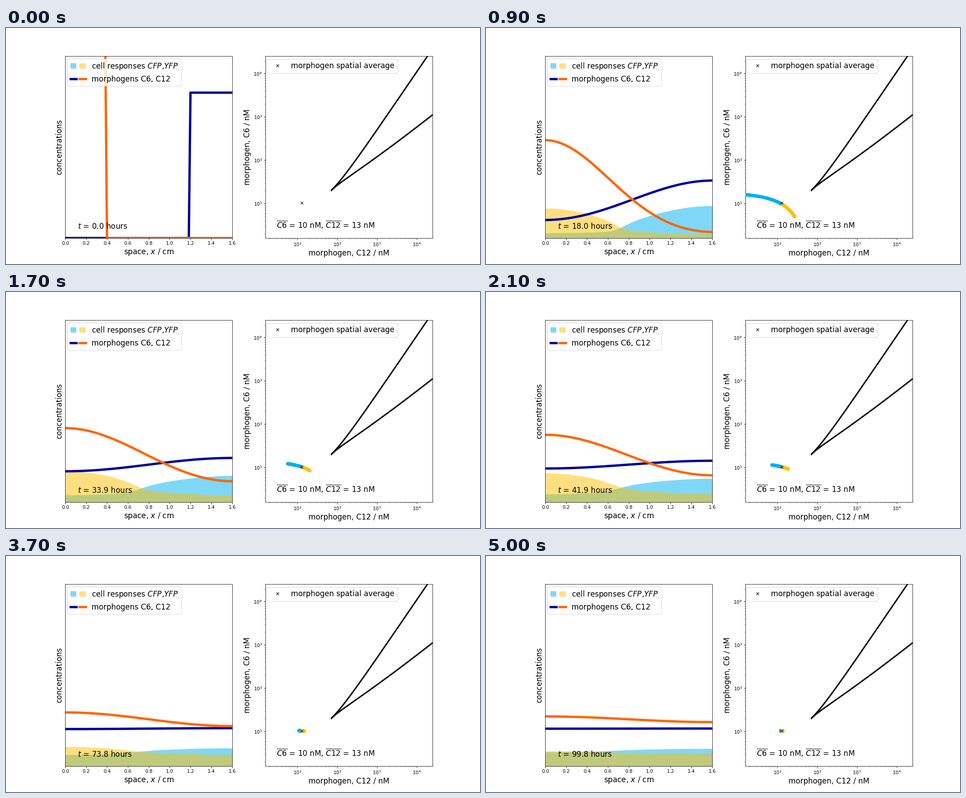
A matplotlib script that plays this animation: 1058x529 px, repeating every 5.1 s.

```python
import numpy as np
import matplotlib.pyplot as plt
from matplotlib.animation import FuncAnimation
from matplotlib.legend_handler import HandlerTuple
from matplotlib.patches import Patch

FRAMES, INTERVAL = 51, 100
HOURS_PER_FRAME = 1.9955
N, LENGTH, TOP = 101, 1.6, 50
NAVY, ORANGE, CYAN, YELLOW = "#000099", "#ff6600", "#00b0f0", "#ffc000"
FS = 16

cell = np.arange(N)
x = np.linspace(0, LENGTH, N)
MODES = np.cos(np.pi * np.outer(cell + 0.5, cell) / N)
C6_START = np.where(cell >= 75, 40.0, 0.0)
C12_START = np.where(cell < 25, 52.0, 0.0)


def diffuse(start, diffusivity, hours):
    """Diffusion with closed ends, as a decaying cosine series."""
    weights = MODES.T @ start * 2 / N
    weights[0] /= 2
    rate = diffusivity * (np.pi * cell / (N * LENGTH / (N - 1))) ** 2
    return MODES @ (weights * np.exp(-rate * hours))


def fade(t, tau, power=1):
    return np.exp(-(t / tau) ** power)


def rise(t, tau, power=1):
    return 1 - fade(t, tau, power)


def branches(base, gap, drop, lift, near, share):
    """Blend an induced branch (falling from its peak) with a repressed one."""
    induced = base + gap * (1 - drop * (1 - near))
    repressed = base + gap * lift * near
    return np.maximum(share * induced + (1 - share) * repressed, 0) * TOP / 407.3


def responses(t):
    """CFP and YFP levels along space after t hours."""
    right = (1 - np.cos(np.pi * x / LENGTH)) / 2
    border, blur = 0.73 - 0.0008 * t, 0.05 + 0.0006 * t
    share = 1 / (1 + np.exp((x - border) / blur))

    cfp_base = (7.5 + 0.243 * t) * rise(t, 5)
    cfp_gap = 109 * rise(t, 9.3, 1.3) * fade(t, 37)
    cfp_drop = 0.65 + 0.6 * fade(t, 36, 3)
    cfp = branches(cfp_base, cfp_gap, cfp_drop, 1.3 - cfp_drop, right, 1 - share)

    yfp_base = 29.5 * rise(t, 42, 1.3)
    yfp_gap = 73 * rise(t, 11.8, 1.7) * fade(t, 62, 2)
    yfp = branches(yfp_base, yfp_gap, 1.27 + fade(t, 10), 0.2 + 0.0047 * t,
                   1 - right, share)
    return cfp, yfp


fig, (ax, bx) = plt.subplots(1, 2, figsize=(14, 7), dpi=75.5715)

# Left panel: profiles in space
ax.set(xlim=(0, LENGTH), ylim=(0, TOP), yticks=[])
ax.set_xlabel("space, $x$ / cm", fontsize=FS)
ax.set_ylabel("concentrations", fontsize=FS)
c6_line, = ax.plot(x, C6_START, color=NAVY, lw=5)
c12_line, = ax.plot(x, C12_START, color=ORANGE, lw=5)
clock = ax.text(0.12, 2.6, "", fontsize=FS)
patches = tuple(Patch(facecolor=c, alpha=0.5, lw=0) for c in (CYAN, YELLOW))
ax.legend([patches, (c6_line, c12_line)],
          ["cell responses $CFP$,$YFP$", "morphogens C6, C12"],
          handler_map={tuple: HandlerTuple(ndivide=None)},
          loc="upper left", borderaxespad=0.3, fontsize=FS)
fills = []

# Right panel: morphogen plane, with a cusp-shaped region in log coordinates
LIMITS = (10 ** 0.2, 10 ** 4.4)
bx.set(xscale="log", yscale="log", xlim=LIMITS, ylim=LIMITS)
bx.set_xlabel("morphogen, C12 / nM", fontsize=FS)
bx.set_ylabel("morphogen, C6 / nM", fontsize=FS)
s = np.linspace(0, 2.7, 150)
upper = 1.345 * s - 0.15 * rise(s, 0.35)
lower = 0.62 * s + 0.02 * s ** 2 + 0.04 * rise(s, 0.12)
bx.plot(10 ** (1.851 + np.append(s[::-1], s)),
        10 ** (1.298 + np.append(upper[::-1], lower)), color="k", lw=3)
mean, = bx.plot(C12_START.mean(), C6_START.mean(), "kx", ms=6, ls="none", zorder=4,
                label="morphogen spatial average")
cloud = bx.scatter([], [], s=40, zorder=3)
bx.text(3, 2.66, r"$\overline{C6}$ = 10 nM, $\overline{C12}$ = 13 nM",
        fontsize=FS, zorder=5)
bx.legend(handles=[mean], loc=(0.0075, 0.908), fontsize=FS)


def update(k):
    hours = k * HOURS_PER_FRAME
    c6 = diffuse(C6_START, 0.018, hours)
    c12 = diffuse(C12_START, 0.009, hours)
    cfp, yfp = responses(hours)

    c6_line.set_ydata(c6)
    c12_line.set_ydata(c12)
    clock.set_text(f"$t$ = {float(f'{hours:.3g}')} hours")
    while fills:
        fills.pop().remove()
    for level, color in ((cfp, CYAN), (yfp, YELLOW)):
        fills.append(ax.fill_between(x, level, color=color, alpha=0.5, lw=0))

    yellow = yfp > cfp
    order = np.argsort(yellow, kind="stable")
    points = np.maximum(np.column_stack([c12, c6]), 1e-6)
    cloud.set_offsets(points[order])
    cloud.set_color(np.where(yellow[order], YELLOW, CYAN))
    return c6_line, c12_line, clock, cloud, *fills


anim = FuncAnimation(fig, update, frames=FRAMES, interval=INTERVAL,
                     init_func=lambda: update(0), repeat=True, repeat_delay=0)
plt.show()
```
